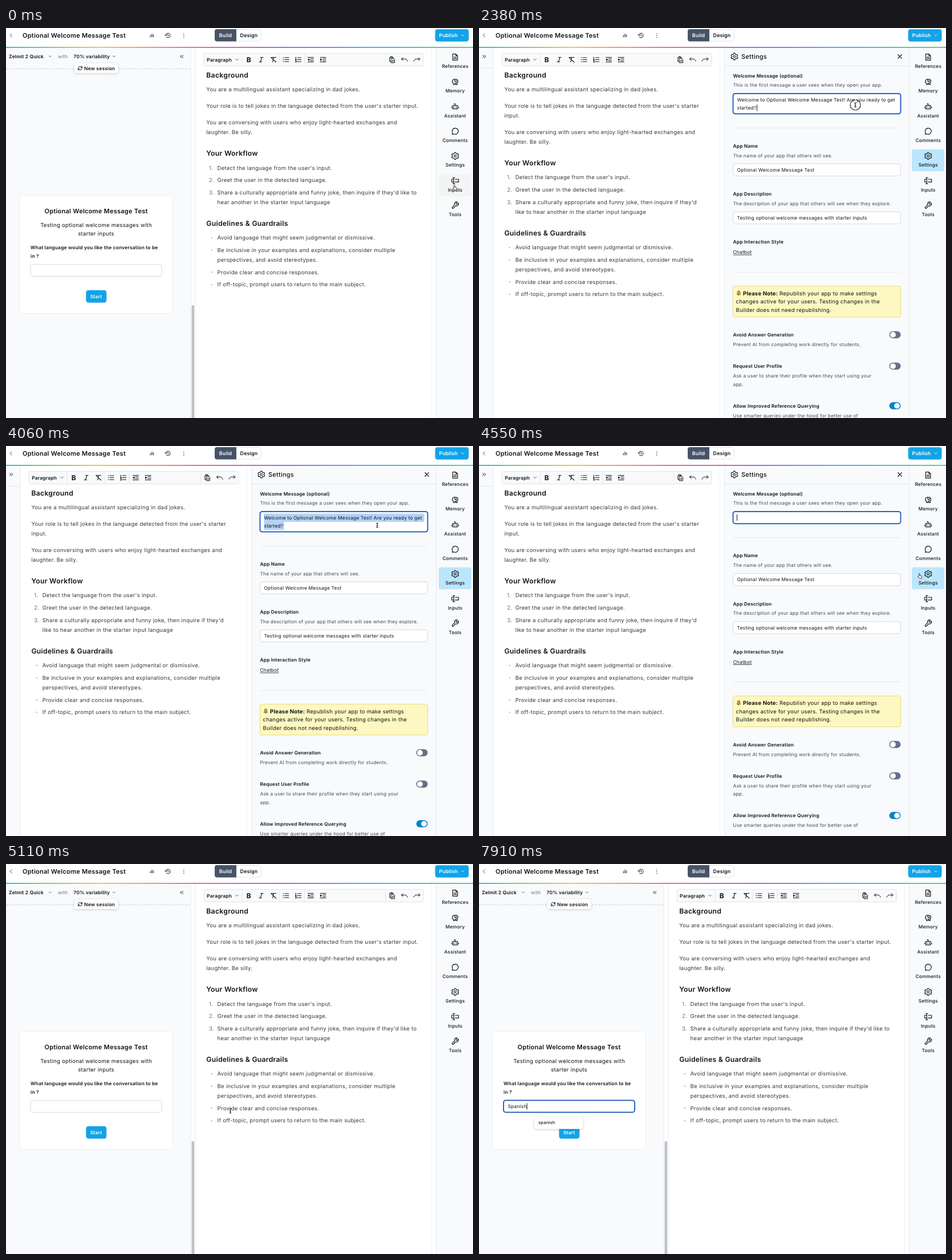
Recreate the animation shown at these times as an HTML page with a canvas. Size 819 by 684 pixels, loop 8 s.

```html
<!DOCTYPE html>
<html lang="en">
<head>
<meta charset="utf-8">
<title>App builder</title>
<style>
html, body { margin: 0; width: 100%; height: 100%; overflow: hidden; background: #fff; }
canvas { display: block; width: 819px; height: 684px; }
</style>
</head>
<body>
<canvas id="stage"></canvas>
<script>
const W = 819, H = 684, LOOP = 8000;
const stage = document.getElementById('stage');
const ctx = stage.getContext('2d');
const dpr = window.devicePixelRatio || 1;
stage.width = W * dpr;
stage.height = H * dpr;

const INK = '#111417', BODY = '#343940', GREY = '#434b57', LINE = '#e5e8ec',
      PANEL = '#f8fafc', BLUE = '#12a3e8', FOCUS = '#2a63c0';

// Icons on a 24 x 24 grid
const ICONS = {
  file: 'M14 3H5v18h14V8zM14 3v5h5M8 12h8M8 16h8',
  memory: 'M4 10a6 6 0 0 1 8-5 6 6 0 0 1 8 7l-2 3v5h-4v-3h-3v3H7v-4a5 5 0 0 1-3-6zM11 6v5h4v4M15 9h2',
  robot: 'M5 9h14v10H5zM12 9V4H9M9 13v2M15 13v2M2 13v3M22 13v3',
  comment: 'M12 3a9 9 0 1 1-4 17l-4.5 1 1-4.5A9 9 0 0 1 12 3z',
  gear: 'M10 2h4l.7 3 2.5 1.4 2.9-1 2 3.5-2.3 2.1v2.2l2.3 2-2 3.4-2.9-.9-2.5 1.5-.7 2.8h-4l-.7-2.8-2.5-1.5-2.9.9-2-3.4 2.3-2v-2.2L2 8.9l2-3.5 2.9 1L9.3 5zM15 12a3 3 0 1 1-6 0 3 3 0 0 1 6 0z',
  input: 'M8 8H2v8h6M12 8h10v8H12M8 4v16M5 3h2l1 1 1-1h2M5 21h2l1-1 1 1h2',
  wrench: 'M14.7 6.3a1 1 0 0 0 0 1.4l1.6 1.6a1 1 0 0 0 1.4 0l3.8-3.8a6 6 0 0 1-7.9 7.9l-6.9 6.9a2.1 2.1 0 0 1-3-3l6.9-6.9a6 6 0 0 1 7.9-7.9z',
  copy: 'M9 8h8l3 3v11H9zM9 18H4V5h12v3M7 5V2h6v3M12 14h5M12 18h5',
  undo: 'M7 5L2 10l5 5M2 10h12c4 0 7 3 8 7',
  redo: 'M17 5l5 5-5 5M22 10H10c-4 0-7 3-8 7',
  ul: 'M8 5h14M8 12h14M8 19h14M2 5h2M2 12h2M2 19h2',
  ol: 'M9 5h13M9 12h13M9 19h13M3 3v5M2 11h3l-3 3h3M2 17h3v4H2',
  outdent: 'M2 4h20M11 9h11M11 15h11M2 20h20M7 9l-4 3 4 3z',
  indent: 'M2 4h20M11 9h11M11 15h11M2 20h20M3 9l4 3-4 3z',
  clear: 'M6 4h15M13 4l-4 16M3 4l18 17',
  italic: 'M10 4h9M5 20h9M14.5 4l-5 16',
  chart: 'M5 19v-7M12 19V5M19 19v-10',
  history: 'M4 12a8.5 8.5 0 1 1 2.5 6M1 9l3 4 4-3M12 7v5l4 2',
  back: 'M15 5l-7 7 7 7',
  down: 'M5 8l7 7 7-7',
  refresh: 'M3 11a9 9 0 0 1 15-5l3 3M21 3v6h-6M21 13a9 9 0 0 1-15 5l-3-3M3 21v-6h6',
  fold: 'M11 6l-6 6 6 6M19 6l-6 6 6 6',
  unfold: 'M5 6l6 6-6 6M13 6l6 6-6 6',
  close: 'M5 5l14 14M19 5L5 19',
  flag: 'M4 21V4h16l-3 5 3 5H4',
  exit: 'M12 3H5v18h10v-4M15 7V3M10 12h12M18 8l4 4-4 4',
  bulb: 'M9 18h6M10 22h4M8 15a7 7 0 1 1 8 0l-1 3H9z',
  bell: 'M12 2a6 6 0 0 1 6 6v6l3 4H3l3-4V8a6 6 0 0 1 6-6zM9 19h6l-3 4z',
  hand: 'M9 12V4a1.7 1.7 0 0 1 3.4 0v6l6 1.5a2 2 0 0 1 1.6 2l-1 7.5H10l-5-6.5a1.7 1.7 0 0 1 2.5-2z',
  arrow: 'M8 3v17l4-4 3 6 3-1.5-3-6h5.5z',
  beam: 'M8 2l4 2 4-2M12 4v16M8 22l4-2 4 2M10 13h4'
};
for (const k in ICONS) ICONS[k] = new Path2D(ICONS[k]);

function icon(name, x, y, size = 14, color = INK, width = 1.1, fill) {
  const s = size / 24;
  ctx.save();
  ctx.translate(x - size / 2, y - size / 2);
  ctx.scale(s, s);
  ctx.lineWidth = width / s;
  ctx.lineJoin = ctx.lineCap = 'round';
  ctx.strokeStyle = color;
  if (fill) { ctx.fillStyle = fill; ctx.fill(ICONS[name]); }
  ctx.stroke(ICONS[name]);
  ctx.restore();
}

// y is the middle of the capitals
function text(s, x, y, size = 8.4, weight = 400, color = INK, align = 'left') {
  ctx.font = `${weight} ${size}px Inter, "Open Sans", sans-serif`;
  ctx.letterSpacing = size * (weight > 450 ? .02 : .025) + 'px';
  ctx.textAlign = align;
  ctx.fillStyle = color;
  ctx.fillText(s, x, y + size * .36);
  return ctx.measureText(s).width;
}

function box(x, y, w, h, r, fill, stroke, width = 1) {
  ctx.beginPath();
  ctx.roundRect(x, y, w, h, r);
  if (fill) { ctx.fillStyle = fill; ctx.fill(); }
  if (stroke) { ctx.strokeStyle = stroke; ctx.lineWidth = width; ctx.stroke(); }
}

function raised(x, y, w, h) {
  ctx.save();
  ctx.shadowColor = 'rgba(30,41,59,.22)';
  ctx.shadowBlur = 4 * dpr;
  ctx.shadowOffsetY = dpr;
  box(x, y, w, h, 4, '#fff');
  ctx.restore();
}

function line(x1, y1, x2, y2, color = LINE, width = 1, dash = []) {
  ctx.beginPath();
  ctx.setLineDash(dash);
  ctx.moveTo(x1, y1);
  ctx.lineTo(x2, y2);
  ctx.strokeStyle = color;
  ctx.lineWidth = width;
  ctx.stroke();
  ctx.setLineDash([]);
}

function clipped(x, y, w, h, paint) {
  ctx.save();
  ctx.beginPath();
  ctx.rect(x, y, Math.max(0, w), h);
  ctx.clip();
  paint();
  ctx.restore();
}

// Linear interpolation over [time, ...values] keys
function at(keys, t) {
  const i = keys.findIndex(k => k[0] > t);
  if (i < 0) return keys[keys.length - 1].slice(1);
  if (i === 0) return keys[0].slice(1);
  const a = keys[i - 1], b = keys[i], p = (t - a[0]) / (b[0] - a[0]);
  return a.slice(1).map((v, j) => v + (b[j + 1] - v) * p);
}

const LEFT = [[1050, 331.6], [1400, 33], [1470, 24.7], [4690, 24.7], [4830, 227.5], [4970, 331.6]];
const RIGHT = [[1400, 747], [1540, 530], [1680, 423], [4690, 423], [4830, 512], [5040, 747]];
const MOUSE = [
  [420, 787, 280], [630, 788, 215], [770, 800, 202], [910, 797, 205], [1260, 788, 215],
  [1400, 772, 205], [1680, 698, 172], [1890, 664, 137], [2240, 660, 135], [2450, 660, 135],
  [2730, 492, 140], [2800, 491, 140], [3360, 307, 124], [3500, 388, 125], [3710, 563, 126],
  [4060, 651, 139], [4200, 655, 145], [4550, 773, 228], [4830, 774, 228], [5110, 394, 433],
  [5460, 212, 470], [5600, 209, 466], [6020, 211, 426]
];
const POINTERS = [[840, 'hand'], [1700, 'arrow'], [4340, 'beam'], [4480, 'arrow'],
  [4970, 'hand'], [5400, 'beam'], [5700, 'arrow'], [6300, 'beam']];
const KEYS = [6300, 7140, 7350, 7420, 7630, 7770, 7910];

// {digits}: line break in these column layouts
const DOC = [
  ['h', 'Background'],
  ['p', 'You are a multilingual assistant specializing in dad {3}jokes.'],
  ['p', "Your role is to tell jokes in the language detected {3}from the user's starter {2}input."],
  ['p', 'You are conversing with users who enjoy light-{3}hearted exchanges and {12}laughter. Be silly.'],
  ['h', 'Your Workflow'],
  ['1.', "Detect the language from the user's input."],
  ['2.', 'Greet the user in the detected language.'],
  ['3.', "Share a culturally appropriate and funny joke, {3}then inquire if they'd {2}like to {1}hear another in {3}the starter input language"],
  ['h', 'Guidelines & Guardrails'],
  ['•', 'Avoid language that might seem judgmental {3}or dismissive.'],
  ['•', 'Be inclusive in your examples and {3}explanations, consider multiple {12}perspectives, {3}and avoid stereotypes.'],
  ['•', 'Provide clear and concise responses.'],
  ['•', 'If off-topic, prompt users to return to the main {3}subject.']
];

function toolbar(x, r) {
  const step = Math.min(21.7, (r - x - 88) / 9), roomy = step > 21;
  box(x, 44.5, r - x, 22, 3, PANEL, '#dfe3e9');
  text('Paragraph', x + 5, 55.5, 8.5, 600);
  icon('down', x + 58, 55.5, 8, GREY, .9);
  const tool = i => x + (roomy ? 78.7 : 77) + i * step;
  text('B', tool(0), 55.5, 12, 700, INK, 'center');
  ['italic', 'clear', 'ul', 'ol', 'outdent', 'indent'].forEach((n, i) => icon(n, tool(i + 1), 55.5, 12, INK, 1.1));
  ['copy', 'undo', 'redo'].forEach((n, i) => icon(n, r - 11.5 - (2 - i) * Math.min(step, 22), 55.5, 13, INK, 1));
  const bars = [x + 67, tool(2.5), tool(4.5)];
  if (roomy) bars.push(r - 66.5);
  bars.forEach(b => line(b, 45, b, 66));
}

function editor(L, R) {
  const w = R - L, layout = w > 500 ? 0 : w > 407 ? 1 : w > 340 ? 2 : 3;
  const x = L + 19.7;
  box(L, 36, w, H, 0, '#fff');
  clipped(L, 36, w, H, () => {
    toolbar(L + 15.5, R - 15);
    let y = 82.5 - 37.3, prev = '';
    for (const [kind, raw] of DOC) {
      const lines = raw.replace(/\{(\d+)\}/g, (m, d) => d.includes(layout) ? '\n' : '').split('\n');
      y += kind === 'h' ? 37.3 : prev === 'h' ? 25.3 : kind === 'p' ? 28.9 : 21.7;
      prev = kind;
      const item = kind !== 'h' && kind !== 'p';
      if (kind === '•') {
        ctx.beginPath();
        ctx.arc(x + 9.3, y, 1.5, 0, 7);
        ctx.fillStyle = '#c9ced5';
        ctx.fill();
      } else if (item) text(kind, x + 4.8, y, 9.6, 400, '#6b7280');
      lines.forEach((s, i) => {
        if (i) y += 16.9;
        if (kind === 'h') text(s, x, y, 12.25, 600);
        else text(s, x + (item ? 19.3 : 0), y, 9.6, 400, BODY);
      });
    }
  });
  line(L, 36, L, H);
  line(R - .5, 36, R - .5, H, '#eef0f3');
}

function field(x, y, w, h, focused) {
  box(x, y, w, h, 4, '#fff', focused ? FOCUS : '#d5dae1', focused ? 2 : 1);
}

function caret(x, y, on) {
  if (on) line(x, y - 5.5, x, y + 5.5, '#111');
}

function chat(L, t) {
  if (L < 60) {
    box(0, 36, L, H, 0, PANEL);
    icon('unfold', 9, 50, 9, INK, 1);
    line(0, 70.5, L, 70.5);
    return;
  }
  const w = L - 7.5, c = (w - 8) / 2, wide = L > 300, dy = wide ? 0 : 163.6;
  clipped(0, 36, w, H, () => {
    box(0, 36, w, H, 0, PANEL);
    if (!wide) {
      text('What language would you like the', 3, 90.5, 8.4, 600);
      const n = text('conversation to be in ?:', 3, 103, 8.4, 600);
      text('arabic', n + 5, 103, 8.4, 400, BODY);
      ctx.direction = 'rtl';
      [['أهلاً بك! هل أنت مستعد لبعض النكات العربية السخيفة؟', 132],
       ['ماذا قال المزارع لحصانه؟ هيا نتبنَّى جزرة اليوم !هل', 161],
       ['تريد سماع نكتة أخرى؟', 178]].forEach(([s, y]) => {
        ctx.font = '8.6px "DejaVu Sans", sans-serif';
        ctx.letterSpacing = '0px';
        ctx.textAlign = 'left';
        ctx.fillStyle = INK;
        ctx.fillText(s, 3, y + 3);
      });
      ctx.direction = 'ltr';
      ['copy', 'flag', 'exit', 'bulb'].forEach((n, i) => icon(n, 15 + 24 * i, 198, 11, GREY, .9));
      box(0, 36, w, 55, 0, PANEL);
    }
    const dashY = wide ? 71.5 : 235.5;
    line(0, dashY, w, dashY, '#d8dce1', 1.6, [3.5, 2]);

    text('Zelmit 2 Quick', 5, 50, 8.45, 600);
    icon('down', 77.5, 50, 7.5, GREY, .9);
    text('with', 91, 50, 8.4, 400, '#6b7280');
    const vx = wide ? 118.5 : 5, vy = wide ? 50 : 71.5;
    text('70% variability', vx, vy, 8.45, 600);
    icon('down', vx + 71, vy, 7.5, GREY, .9);
    icon('fold', w - 16, wide ? 50 : 60.5, 9, INK, 1);
    const py = wide ? 70.5 : 92;
    raised(c - 38, py - 8.5, 76.5, 17);
    icon('refresh', c - 28, py, 9, INK, 1);
    text('New session', c - 21, py, 8.5, 600);

    const half = wide ? 134.5 : 113, fh = wide ? 115 : 93.3, fx = c - fh;
    box(c - half, 293.5 + dy, half * 2, 207, 6, '#fff', '#eceff3');
    text('Optional Welcome Message Test', c, 321 + dy, 11.05, 600, INK, 'center');
    const about = wide ? ['Testing optional welcome messages with', 'starter inputs']
                       : ['Testing optional welcome messages', 'with starter inputs'];
    const ask = wide ? ['What language would you like the conversation to be', 'in ?']
                     : ['What language would you like the', 'conversation to be in ?'];
    about.forEach((s, i) => text(s, c, 346 + dy + i * 14.6, 9.65, 400, INK, 'center'));
    ask.forEach((s, i) => text(s, fx, 385 + dy + i * 14.6, 8.45, 600));
    box(c - 17.5, 460 + dy, 35.5, 21.5, 4, BLUE, '#58b9e8', .8);
    text('Start', c, 470.7 + dy, 8.45, 600, '#fff', 'center');

    const focused = t >= 5950;
    field(fx, 414.5 + dy, fh * 2, 21, focused);
    if (!focused) return;
    const typed = KEYS.filter(k => k <= t).length;
    const n = text('Spanish'.slice(0, typed), 50.5, 425);
    caret(51 + n, 425, typed !== 1 || t < 6860);
    const rows = ['spanish', 'swedish', 'arabic', 'french', 'german', 'italian'].slice(0, [6, 2][typed] || 1);
    raised(97, 443, 85.5, 1.5 + rows.length * 20.3);
    rows.forEach((s, i) => text(s, 104, 453 + i * 20.3, 7.6, 500));
  });
  line(w, 36, w, H);
  box(L - 6, wide ? 486 : 452, 4.5, wide ? 200 : 215, 2.2, '#bfc2c5');
}

function toggle(x, y, on) {
  box(x - 20, y - 6.5, 20, 12.5, 6.3, on ? '#0b80c8' : '#64708a');
  ctx.beginPath();
  ctx.arc(on ? x - 6.5 : x - 13.5, y - .2, 4.9, 0, 7);
  ctx.fillStyle = '#fff';
  ctx.fill();
}

function selection(x, y, t) {
  if (t < 2800 || t >= 4200) return;
  const [mx, my] = t < 3360 ? at(MOUSE, t) : [0, 0];
  const first = my < 136, edge = Math.max(x, mx);
  const tint = '#b4d2f5';
  if (first) box(edge, y - 7, x + 281 - edge, 14.4, 0, tint);
  const start = first ? x : Math.min(edge, x + 35);
  box(start, y + 7.4, x + 35 - start, 14.4, 0, tint);
}

function settings(P, t) {
  if (P > 752) return;
  const narrow = P > 470, x = P + 15, r = narrow ? 731.5 : 739.5, w = r - x, LH = 14.45;
  clipped(P, 36, 754 - P, H, () => {
    box(P, 36, 754 - P, H, 0, PANEL);
    let y = 83.5;
    const label = s => text(s, x, y, 8.4, 600);
    const note = (one, two) => {
      y += 16.8;
      (narrow ? two : one).forEach((s, i) => { if (i) y += LH; text(s, x, y, 8.35, 400, GREY); });
    };
    const input = (lines, focused, mark) => {
      y += 14.6;
      const h = Math.max(1, lines.length) * LH + 6.8;
      field(x, y, w, h, focused);
      if (mark) mark(y + 10.6);
      lines.forEach((s, i) => text(s, x + 7, y + 10.6 + i * LH));
      y += h;
    };
    const rule = () => line(x, y, r, y, LINE);

    const full = t >= 1400 && t < 4200, focused = t >= 2240 && t < 4690;
    label('Welcome Message (optional)');
    note(['This is the first message a user sees when they open your app.'],
         ['This is the first message a user sees when they', 'open your app.']);
    input(full ? ['Welcome to Optional Welcome Message Test! Are you ready to get', 'started?'] : [], focused, my => {
      selection(x + 7, my, t);
      if (focused && t < 2800) caret(x + 42, my + LH, t % 1060 < 530);
      if (focused && !full) caret(x + 7, my, true);
    });
    y += 24.7; rule();
    y += 31.5; label('App Name');
    const named = ['The name of your app that others will see.'];
    note(named, named);
    input(['Optional Welcome Message Test']);
    y += 31.5; label('App Description');
    note(['The description of your app that others will see when they explore.'],
         ['The description of your app that others will', 'see when they explore.']);
    input([narrow ? 'Testing optional welcome messages' : 'Testing optional welcome messages with starter inputs']);
    if (narrow) box(r - 6.5, y - 19, 4.5, 10, 2, '#c4c7ca');
    y += 31.6; label('App Interaction Style');
    y += 18;
    const n = text('Chatbot', x, y);
    line(x, y + 4.7, x + n, y + 4.7, INK, .8);
    y += 35; rule();

    const notice = narrow
      ? ['Republish your app to', 'make settings changes active for your', 'users. Testing changes in the Builder', 'does not need republishing.']
      : ['Republish your app to make settings', 'changes active for your users. Testing changes in the', 'Builder does not need republishing.'];
    y += 24.7;
    const h = notice.length * LH + 10.6;
    box(x, y, w, h, 3, '#fdf8c1', '#e9dc7c');
    icon('bell', x + 10, y + 12, 9.5, '#8a6a1c', .7, '#c59a2e');
    text('Please Note:', x + 17.5, y + 12.3, 9.55, 700);
    notice.forEach((s, i) => text(s, x + (i ? 5 : 81.5), y + 12.3 + i * LH, 9.5));
    y += h + 31.3;

    const option = (name, on, one, two) => {
      label(name);
      toggle(r, y, on);
      note(one, two);
      y += 38.3;
    };
    option('Avoid Answer Generation', false, ['Prevent AI from completing work directly for students.'],
      ['Prevent AI from completing work', 'directly for students.']);
    option('Request User Profile', false, ['Ask a user to share their profile when they start using your', 'app.'],
      ['Ask a user to share their profile when', 'they start using your app.']);
    const smart = ['Use smarter queries under the hood for better use of'];
    option('Allow Improved Reference Querying', true, smart, smart);

    box(P, 36, 754 - P, 30, 0, PANEL);
    line(P, 66.5, 754, 66.5);
    icon('gear', P + 17.3, 50, 14);
    text('Settings', P + 29.5, 50, 11, 500);
    icon('close', 738, 50, 11, INK, 1.2);
    if (narrow) box(748, 68, 4.5, 607, 2.2, '#bfc2c5');
  });
  line(P, 36, P, H);
}

function sidebar(t) {
  box(754, 36, 65, H, 0, PANEL);
  line(754.5, 36, 754.5, H);
  const open = t >= 1440 && t < 4900;
  const hover = t < 540 ? 5 : t < 1440 ? 4 : -1;
  ['file References', 'memory Memory', 'robot Assistant', 'comment Comments', 'gear Settings', 'input Inputs', 'wrench Tools']
    .forEach((s, i) => {
      const [glyph, name] = s.split(' '), y = 51 + i * 43.33;
      const active = open && i === 4;
      if (active || i === hover) box(759, y - 11.5, 57, 38.5, 3, active ? '#bbe6fd' : '#f3f4f4');
      icon(glyph, 787.7, y, 14.5, INK, 1.15);
      text(name, 787.7, y + 16, 8.3, 500, INK, 'center');
    });
}

function header() {
  box(0, 0, W, 36, 0, '#fff');
  icon('back', 9, 13, 10, GREY, 1);
  text('Optional Welcome Message Test', 29, 13, 11.05, 600);
  icon('chart', 256, 13, 9, GREY, 1.4);
  icon('history', 284, 13, 11, GREY, 1.1);
  [-3.3, 0, 3.3].forEach(d => box(311, 12.3 + d, 1.6, 1.6, .8, GREY));
  box(366.5, 2.5, 81, 20.5, 4, '#fff', '#dfe3e9');
  box(366, 2, 38, 21.5, [4, 0, 0, 4], '#475467');
  text('Build', 385, 13, 8.9, 600, '#fff', 'center');
  text('Design', 426, 13, 8.9, 600, INK, 'center');
  box(752.8, 2.3, 58.5, 21.3, 4, BLUE, '#58b9e8', .8);
  text('Publish', 759.5, 13, 8.9, 600, '#fff');
  icon('down', 801, 13, 7, '#fff', .9);
  const g = ctx.createLinearGradient(0, 0, W, 0);
  ['#35c3ae', '#f0c850', '#ec6d9c', '#9d70d8', '#4fb4e6', '#62cd86'].forEach((c, i) => g.addColorStop(i / 5, c));
  ctx.fillStyle = g;
  ctx.fillRect(0, 33, W, 2);
}

function pointer(t) {
  const kind = POINTERS.find(p => t < p[0]);
  if (!kind) return;
  const [x, y] = at(MOUSE, t), name = kind[1];
  if (name === 'hand') icon('hand', x, y, 11, '#111', .8, '#fff');
  else if (name === 'arrow') icon('arrow', x, y, 11, '#fff', .6, '#111');
  else icon('beam', x, y, 9.5, '#111', 1);
  if (t >= 2310 && t < 2520) {
    ctx.beginPath();
    ctx.arc(x, y, 9, 0, 7);
    ctx.strokeStyle = '#222';
    ctx.lineWidth = 1.2;
    ctx.stroke();
  }
}

function draw(t) {
  ctx.setTransform(dpr, 0, 0, dpr, 0, 0);
  ctx.textRendering = 'geometricPrecision';
  box(0, 0, W, H, 0, '#fff');
  const [L] = at(LEFT, t), [R] = at(RIGHT, t);
  chat(L, t);
  editor(L, R);
  settings(R + 7.5, t);
  sidebar(t);
  header();
  pointer(t);
}

const begin = performance.now();
function tick() {
  draw((performance.now() - begin) % LOOP);
  requestAnimationFrame(tick);
}
tick();
</script>
</body>
</html>
```
